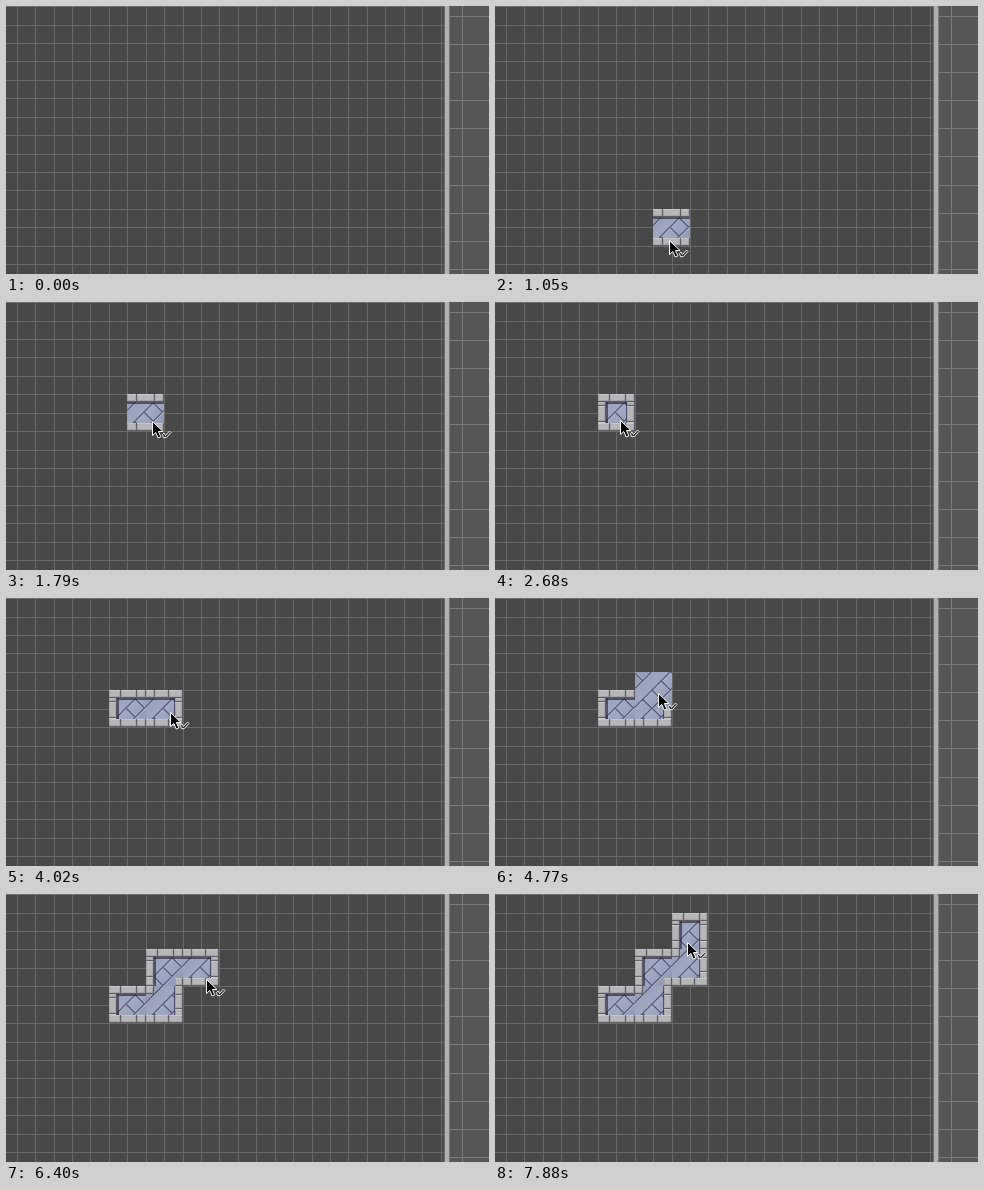
An HTML page with a canvas that plays this animation: 483 px wide and 268 px high, repeating every 8 s.

```html
<!DOCTYPE html>
<html lang="en">
<head>
<meta charset="utf-8">
<title>Tile painting</title>
<style>
  html, body { margin: 0; width: 100%; height: 100%; overflow: hidden; background: #484848; }
  canvas { display: block; }
</style>
</head>
<body>
<canvas id="stage" width="483" height="268"></canvas>
<script>
const ctx = document.getElementById('stage').getContext('2d');
const LOOP = 8000, CELL = 18.43, WALL = 8;
const gridX = col => Math.floor(11.2 + CELL * col);
const gridY = row => Math.floor(0.6 + CELL * row);

// Each move holds one cursor point per step. `paint` is the step that lays `block`;
// until then the brush shows at `brush`, or follows the pointer if there is none.
const moves = [
  { start: 600, end: 1790, path: [[234, 247], [222, 245], [200, 241], [174, 234], [146, 206],
    [117, 162], [108, 128], [127, 118], [146, 119]] },
  { start: 2080, end: 2680, block: [5, 5], paint: 3,
    path: [[141, 119], [133, 119], [127, 119], [125, 119], [125, 118]] },
  { start: 3580, end: 4320, block: [7, 5], paint: 2, brush: [6, 5],
    path: [[136, 118], [148, 116], [159, 115], [164, 114], [164, 114], [163, 114]] },
  { start: 4620, end: 5220, block: [7, 3], paint: 2, brush: [7, 4],
    path: [[163, 106], [163, 95], [163, 86], [163, 81], [163, 80]] },
  { start: 5510, end: 6400, block: [9, 3], paint: 2, brush: [8, 2],
    path: [[183, 75], [194, 78], [198, 81], [200, 83], [200, 84], [200, 85], [200, 85]] },
  { start: 6850, end: 7580, block: [9, 1], paint: 2, brush: [9, 2],
    path: [[200, 76], [198, 64], [195, 55], [194, 51], [193, 49], [193, 49]] },
  { start: 7880, end: 7880, path: [[192, 48]], block: null, paint: 0 }
];

function rect(color, x, y, w, h) {
  ctx.fillStyle = color;
  ctx.fillRect(x, y, w, h);
}

function drawBoard() {
  rect('#484848', 0, 0, 483, 268);
  for (let i = 0; i < 24; i++) rect('#6a6a6a', gridX(i), 0, 1, 268);
  for (let i = 0; i < 15; i++) rect('#6a6a6a', 0, gridY(i), 438, 1);
  rect('#555', 443, 0, 40, 268);
  rect('#7c7c7c', 456, 0, 1, 268);
  for (let i = 0; i < 10; i++) rect('#7c7c7c', 443, Math.floor(10.4 + 28.1 * i), 40, 1);
  rect('#6e6e6e', 438, 0, 1, 268);
  rect('#b0b0b0', 439, 0, 4, 268);
  rect('#7a7a7a', 443, 0, 1, 268);
}

function drawFloor(x, y, w, h) {
  ctx.save();
  ctx.beginPath();
  ctx.rect(x, y, w, h);
  ctx.clip();
  ctx.translate(x, y);
  const shade = ctx.createLinearGradient(0, 0, w, h);
  shade.addColorStop(0, '#9299b3');
  shade.addColorStop(0.5, '#a1a9c3');
  shade.addColorStop(1, '#8d95b2');
  rect(shade, 0, 0, w, h);

  // Rising seams make planks; falling seams cut every second plank into squares.
  const seams = (color, shift) => {
    ctx.strokeStyle = color;
    ctx.beginPath();
    for (let sum = -2; sum < 80; sum += 18.5) {
      ctx.moveTo(sum + shift, 0);
      ctx.lineTo(shift, sum);
    }
    for (const sum of [-2, 35]) {
      for (let diff = -38; diff < 40; diff += 18.5) {
        ctx.moveTo((sum + diff) / 2 + shift, (sum - diff) / 2);
        ctx.lineTo((sum + 18.5 + diff) / 2 + shift, (sum + 18.5 - diff) / 2);
      }
    }
    ctx.stroke();
  };
  ctx.lineWidth = 1;
  seams('#b4bad0', 1.4);
  ctx.lineWidth = 1.2;
  seams('#535773', 0);
  ctx.restore();
}

function drawBrick(x, y, w, h) {
  rect('#5d5d62', x, y, w, h);
  rect('#a5a5a8', x, y, w - 1, h - 1);
  rect('#c6c6c8', x, y, w - 1, 1);
  rect('#b6b6b9', x + 1, y + 1, w - 3, h - 3);
}

function drawWall(x, y, length, vertical, joints) {
  const edges = [0, ...joints, length];
  for (let i = 0; i < edges.length - 1; i++) {
    const from = edges[i], size = edges[i + 1] - from;
    if (vertical) drawBrick(x, y + from, WALL, size);
    else drawBrick(x + from, y, size, WALL);
  }
}

function drawBlock([col, row], isOpen, joints) {
  const x = gridX(col), y = gridY(row);
  const w = gridX(col + 2) - x, h = gridY(row + 2) - y;
  const right = x + w - WALL, bottom = y + h - WALL;
  const left = isOpen(-1, 0), up = isOpen(0, -1);
  const hasRight = isOpen(1, 0), down = isOpen(0, 1);
  const spacing = joined => joints || (joined ? [9, 23] : [12, 28]);
  const shadow = 'rgba(40, 36, 60, 0.65)';
  drawFloor(x, y, w, h);
  if (!up) rect(shadow, x, y + WALL, w, 2);
  if (!left) rect(shadow, x + WALL, y, 2, h);
  if (!hasRight) rect(shadow, right - 1, y, 1, h);
  if (!left) drawWall(x, y, h, true, spacing(up));
  if (!hasRight) drawWall(right, y, h, true, spacing(up));
  if (!up) drawWall(x, y, w, false, spacing(left));
  if (!down) drawWall(x, bottom, w, false, spacing(left));
  for (const dx of [-1, 1]) {
    for (const dy of [-1, 1]) {
      if (isOpen(dx, 0) && isOpen(0, dy) && !isOpen(dx, dy))
        drawBrick(dx < 0 ? x : right, dy < 0 ? y : bottom, WALL, WALL);
    }
  }
}

function drawRoom(blocks) {
  for (const block of blocks) {
    const isOpen = (dx, dy) => blocks.some(([c, r]) =>
      c === block[0] + 2 * dx && r === block[1] + 2 * dy);
    drawBlock(block, isOpen);
  }
}

const arrow = new Path2D('M.5 .5V14.5L3.8 11.5L6.2 17L8.8 15.9L6.4 10.5H11Z');
const pen = new Path2D('M10.5 13.5L12 12L13.5 14.5L17.5 10L19 11.5L14.5 16.5L11.5 16.8Z');

function drawCursor([x, y]) {
  ctx.save();
  ctx.translate(x, y);
  ctx.lineWidth = 1;
  ctx.fillStyle = '#000';
  ctx.strokeStyle = '#fff';
  ctx.fill(arrow);
  ctx.stroke(arrow);
  ctx.fillStyle = '#333';
  ctx.strokeStyle = '#eee';
  ctx.fill(pen);
  ctx.stroke(pen);
  ctx.restore();
}

function stepAt(move, time) {
  const last = move.path.length - 1;
  const gap = last ? (move.end - move.start) / last : 0;
  let step = 0;
  while (step < last && time >= Math.floor((move.start + gap * (step + 1)) / 10) * 10) step++;
  return step;
}

function draw(time) {
  drawBoard();
  const begun = moves.filter(move => time >= move.start);
  if (!begun.length) return;
  const move = begun[begun.length - 1], step = stepAt(move, time);
  const point = move.path[step];
  drawRoom(begun.filter(m => m.block && stepAt(m, time) >= m.paint).map(m => m.block));

  if (move.paint === undefined || step < move.paint) {
    if (move.brush) {
      drawBlock(move.brush, () => true);
    } else {
      const cell = [Math.round((point[0] - 29.4) / CELL), Math.floor((point[1] - 19) / CELL)];
      drawBlock(cell, (dx, dy) => dy === 0, [10, 28]);
    }
  }
  drawCursor(point);
}

function tick() {
  draw(performance.now() % LOOP);
  requestAnimationFrame(tick);
}
tick();
</script>
</body>
</html>
```
